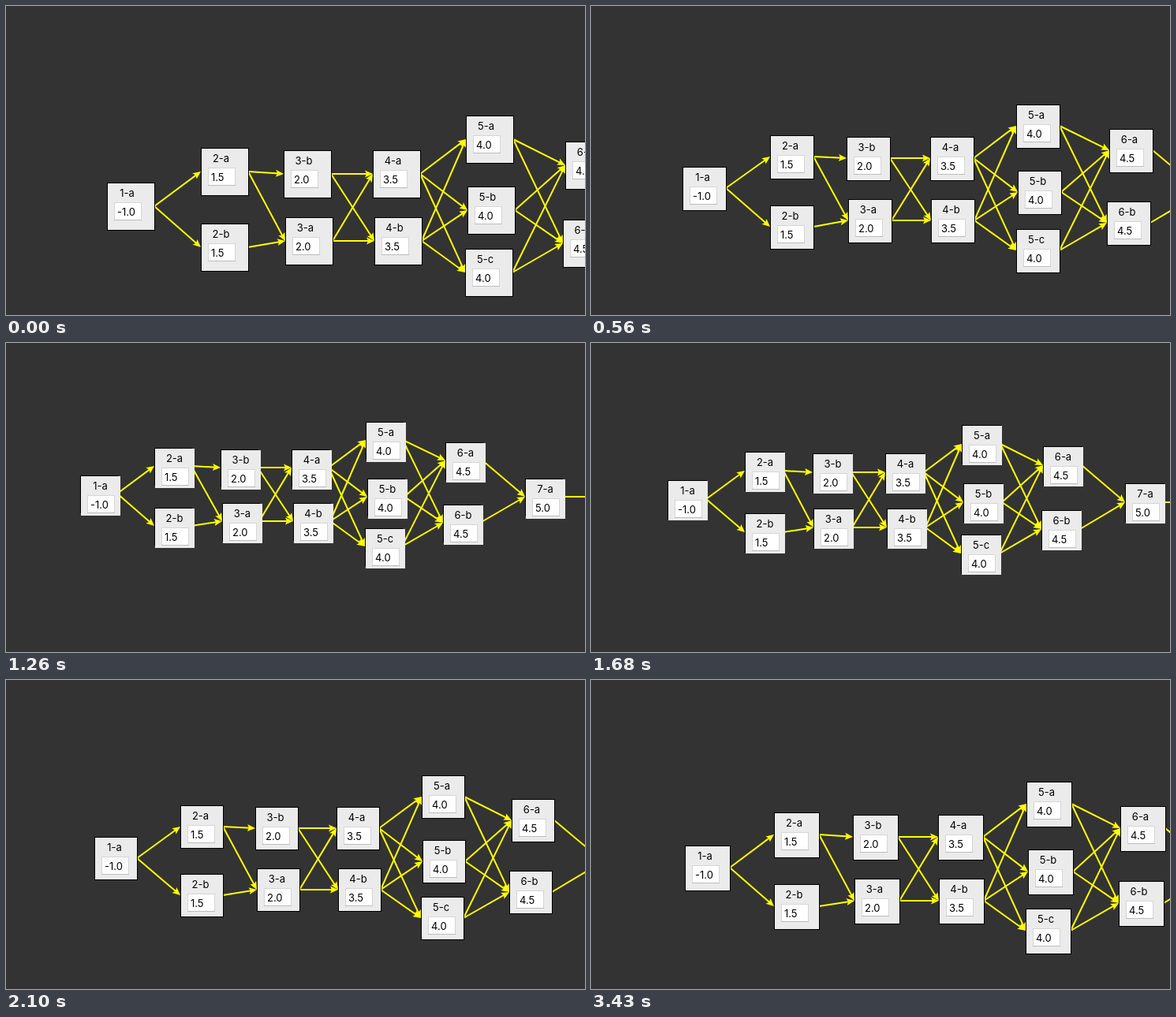
An HTML page that plays this animation: 734 px wide and 392 px high, repeating every 3.5 s.

```html
<!DOCTYPE html>
<html>
<head>
<meta charset="utf-8">
<title>Graph zoom</title>
<style>
html, body { margin: 0; width: 100%; height: 100%; overflow: hidden; background: #333; }
svg { display: block; width: 734px; height: 392px; }
text { font: 13px Inter, Roboto, sans-serif; fill: #000; }
</style>
</head>
<body>
<svg id="stage" viewBox="0 0 734 392" xmlns="http://www.w3.org/2000/svg">
  <rect width="734" height="392" fill="#333"/>
  <g id="edges" stroke="#ff0" stroke-width="2" fill="none"></g>
  <g id="heads" fill="#ff0"></g>
  <g id="nodes"></g>
</svg>
<script>
const LOOP = 3500, TICK = 70, SIDE = 60, MIN_SIDE = 51;
const PIVOT = { x: -39, y: -51 };

// name: [x, y, value]
const nodes = {
  '1-a': [128, 224, '-1.0'],
  '2-a': [247, 180, '1.5'], '2-b': [247, 276, '1.5'],
  '3-b': [352, 183, '2.0'], '3-a': [354, 268, '2.0'],
  '4-a': [465, 183, '3.5'], '4-b': [467, 268, '3.5'],
  '5-a': [583, 139, '4.0'], '5-b': [585, 229, '4.0'], '5-c': [582, 308, '4.0'],
  '6-a': [709, 172, '4.5'], '6-b': [706, 271, '4.5'],
  '7-a': [836, 229, '5.0'], '8-a': [956, 229, '5.5']
};

const links = {
  '1-a': '2-a 2-b', '2-a': '3-b 3-a', '2-b': '3-a',
  '3-b': '4-a 4-b', '3-a': '4-a 4-b',
  '4-a': '5-a 5-b 5-c', '4-b': '5-a 5-b 5-c',
  '5-a': '6-a 6-b', '5-b': '6-a 6-b', '5-c': '6-a 6-b',
  '6-a': '7-a', '6-b': '7-a', '7-a': '8-a'
};

// Each zoom: start time, number of ticks, scale reached.
const zooms = [
  [420, 3, 0.9308], [840, 3, 0.87], [1190, 2, 0.797],
  [1610, 2, 0.819], [1750, 3, 0.86],
  [2100, 1, 0.91], [2170, 1, 0.912], [2380, 3, 0.9505]
];

function scaleAt(t) {
  let s = 1;
  for (const [start, ticks, target] of zooms) {
    if (t < start) break;
    const done = Math.min(ticks, Math.floor((t - start) / TICK) + 1);
    s += (target - s) * done / ticks;
  }
  return s;
}

function add(parent, tag, attrs, label) {
  const el = document.createElementNS('http://www.w3.org/2000/svg', tag);
  set(el, attrs);
  if (label) el.textContent = label;
  parent.appendChild(el);
  return el;
}

function set(el, attrs) {
  for (const key in attrs) el.setAttribute(key, attrs[key]);
}

const byId = id => document.getElementById(id);

const boxes = {};
for (const [name, [x, y, value]] of Object.entries(nodes)) {
  const g = add(byId('nodes'), 'g', {});
  const frame = add(g, 'rect', { x: 0.5, y: 0.5, fill: '#ebebeb', stroke: '#000' });
  add(g, 'rect', { x: 1, y: 1, width: MIN_SIDE - 1, height: MIN_SIDE - 1, fill: '#ebebeb' });
  add(g, 'text', { x: 25.5, y: 18, 'text-anchor': 'middle' }, name);
  add(g, 'rect', { x: 9.5, y: 25.5, width: 34, height: 22, fill: '#fff', stroke: '#d6d6d6' });
  add(g, 'path', { d: 'M9 47.5H44', stroke: '#bdbdbd' });
  add(g, 'text', { x: 13, y: 42 }, value);
  boxes[name] = { x, y, g, frame };
}

const arrows = [];
for (const from in links) {
  for (const to of links[from].split(' ')) {
    arrows.push({
      from: boxes[from], to: boxes[to],
      line: add(byId('edges'), 'path', {}),
      head: add(byId('heads'), 'path', { d: 'M0 0L-10 -4.5L-8 0L-10 4.5Z' })
    });
  }
}

// Boxes snap down to whole pixels.
function draw(s) {
  const side = Math.floor(SIDE * s), half = Math.floor(side / 2);
  for (const b of Object.values(boxes)) {
    b.px = Math.floor(PIVOT.x + (b.x - PIVOT.x) * s);
    b.py = Math.floor(PIVOT.y + (b.y - PIVOT.y) * s);
    set(b.g, { transform: `translate(${b.px} ${b.py})` });
    set(b.frame, { width: side, height: side });
  }
  for (const { from, to, line, head } of arrows) {
    const x1 = from.px + side, y1 = from.py + half;
    const x2 = to.px, y2 = to.py + half;
    const angle = Math.atan2(y2 - y1, x2 - x1);
    const ex = x2 - 6 * Math.cos(angle), ey = y2 - 6 * Math.sin(angle);
    set(line, { d: `M${x1} ${y1}L${ex} ${ey}` });
    set(head, { transform: `translate(${x2} ${y2}) rotate(${angle * 180 / Math.PI})` });
  }
}

const begin = performance.now();
function frame(now) {
  draw(scaleAt(Math.max(0, now - begin) % LOOP));
  requestAnimationFrame(frame);
}
draw(1);
requestAnimationFrame(frame);
</script>
</body>
</html>
```
